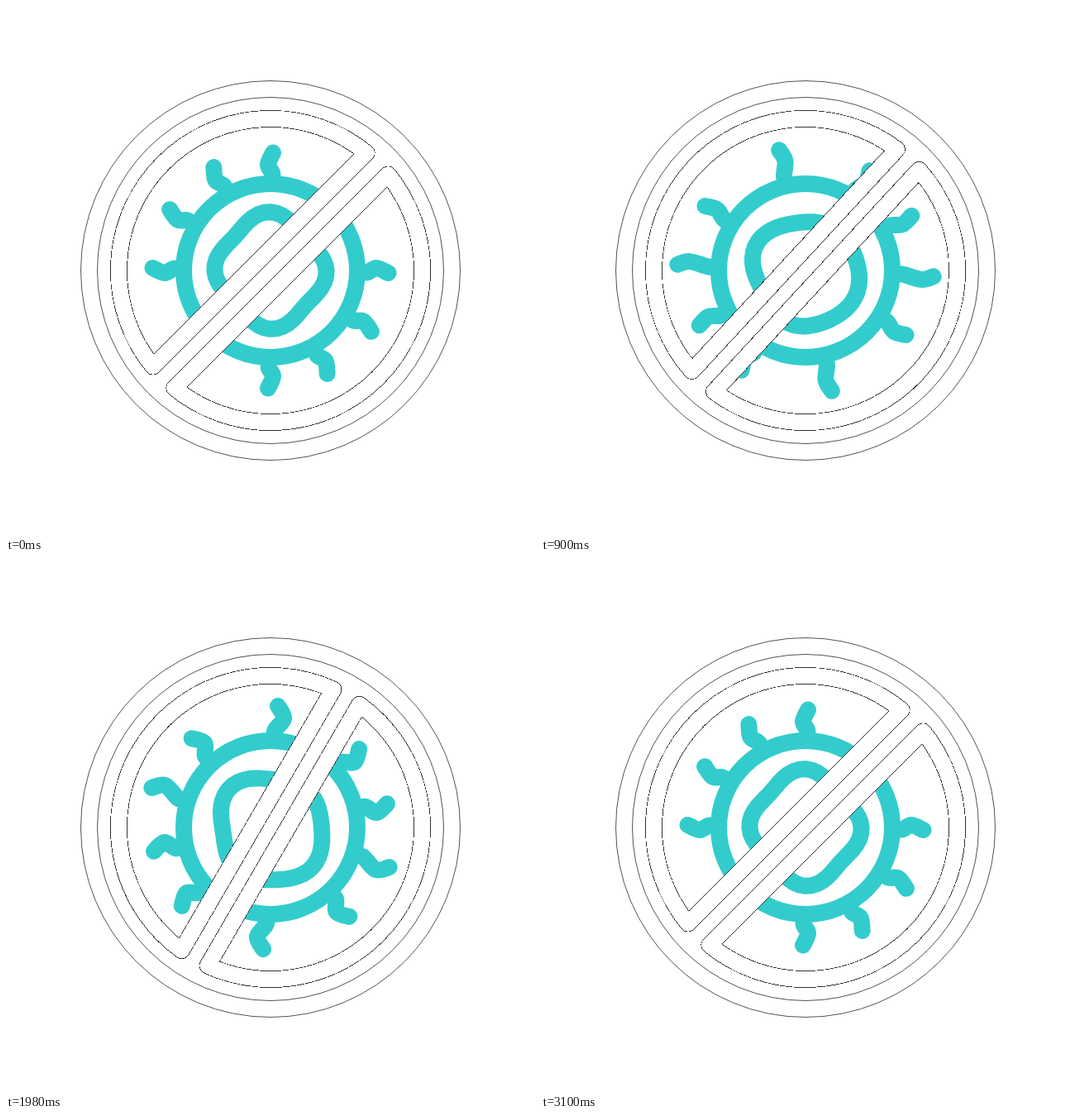
These frames come from a looping animation (640 px wide and 640 px high, 3120 ms). An HTML page:

```html
<!DOCTYPE html>
<html lang="en">
<head>
<meta charset="utf-8">
<title>No virus</title>
<style>
  html, body { margin: 0; width: 100%; height: 100%; overflow: hidden; background: #fff; }
  svg { display: block; width: 100vw; height: 100vh; }
  .virus { fill: none; stroke: #3cc; stroke-width: 20; stroke-linecap: round; stroke-linejoin: round; }
  .ring, .edge, .band { fill: none; stroke-linejoin: round; shape-rendering: crispEdges; }
  .ring { stroke: #333; stroke-width: .85; }
  .edge { stroke: #333; stroke-width: 20.8; }
  .band { stroke: #fff; stroke-width: 19.2; }
</style>
</head>
<body>
<svg viewBox="-320 -320 640 640">
  <defs>
    <path id="half" d="M-182.6 -18.3A183.5 183.5 0 0 1 182.6 -18.3Z"/>
  </defs>
  <g class="virus">
    <circle r="105"/>
    <path id="nucleus"/>
    <path id="spikes"/>
  </g>
  <g id="bar">
    <rect x="-185" y="-20" width="370" height="40" fill="#fff"/>
    <use href="#half" class="edge"/>
    <use href="#half" class="band"/>
    <g transform="rotate(180)">
      <use href="#half" class="edge"/>
      <use href="#half" class="band"/>
    </g>
  </g>
  <circle class="ring" r="229.5"/>
  <circle class="ring" r="209.5"/>
</svg>
<script>
const LOOP = 3120, STEP = 20, LAST = LOOP - STEP;
const byId = id => document.getElementById(id);

// Key poses as [time, value]
const tilt = [[0, 45], [690, 30.7], [1120, 65], [1545, 25], [1965, 59.9], [2450, 38], [LAST, 45]];
const turn = [[0, 0], [680, -50], [1140, -61], [1540, -59], [1980, -41.5], [2400, -5], [LAST, 0]];
const bend = [[0, -3], [680, 8], [1140, 0], [1540, 3], [1980, 8], [2400, -2.5], [LAST, -3]];

// Smooth monotone curve through the keys, flat at turning points
function curve(keys, t) {
  const last = keys.length - 1;
  const slope = i => (keys[i + 1][1] - keys[i][1]) / (keys[i + 1][0] - keys[i][0]);
  const tangent = i => {
    if (i === 0 || i === last) return 0;
    const a = slope(i - 1), b = slope(i);
    return a * b > 0 ? 2 * a * b / (a + b) : 0;
  };
  let i = 0;
  while (i < last - 1 && t > keys[i + 1][0]) i++;
  const [[t0, v0], [t1, v1]] = keys.slice(i, i + 2);
  const h = t1 - t0, x = (t - t0) / h;
  return v0 + (v1 - v0) * x * x * (3 - 2 * x)
    + h * x * (1 - x) * ((1 - x) * tangent(i) - x * tangent(i + 1));
}

const wave = deg => Math.cos(deg * Math.PI / 180);

// Point at distance u along a clockwise angle, shifted sideways by v
function polar(deg, u, v = 0) {
  const s = wave(deg - 90), c = wave(deg);
  return [u * s + v * c, v * s - u * c];
}

const text = p => p.map(n => n.toFixed(2)).join(' ');

// Smooth open path through the points
function smooth(pts) {
  const at = i => pts[Math.max(0, Math.min(pts.length - 1, i))];
  const lead = (p, from, to) => p.map((n, k) => n + (to[k] - from[k]) / 6);
  let d = 'M' + text(pts[0]);
  for (let i = 0; i < pts.length - 1; i++) {
    const p = at(i), q = at(i + 1);
    d += 'C' + [lead(p, at(i - 1), q), lead(q, at(i + 2), p), q].map(text).join(' ');
  }
  return d;
}

// Four lobes at rest; lopsided and slightly lowered as the body winds up
function nucleusPath(spin, wind) {
  const pts = [];
  for (let a = 0; a < 360; a += 6) {
    const r = 63.5
      + (5.7 - 3.7 * wind) * wave(4 * (a + 8 * wind))
      + 2.5 * wave(2 * (a + 25 - 38 * wind))
      + 2 * wind * wave(3 * a);
    const [x, y] = polar(a + spin, r);
    pts.push([x + 1.3 * wind, y + 2.5 * wind]);
  }
  return 'M' + pts.map(text).join('L') + 'Z';
}

function spikePath(deg, length, b) {
  const root = b < 0 ? -.8 * b : -.25 * b;
  const tip = Math.max(0, -b);
  return smooth([
    polar(deg, 106), polar(deg, 117, root), polar(deg, length - 14.5, b), polar(deg, length, tip)
  ]);
}

// Both halves carry the same five spikes, two of which lengthen more
function spikesPath(spin, wind, b) {
  let d = '';
  for (const side of [0, 180])
    for (const [deg, extra] of [[0, 2], [45, 7], [90, 1], [120, 2], [150, 13]])
      d += spikePath(side + deg + spin, 142.5 + extra * wind, b);
  return d;
}

function draw(t) {
  const spin = curve(turn, t), wind = -spin / 60;
  byId('bar').setAttribute('transform', `rotate(${-curve(tilt, t)})`);
  byId('nucleus').setAttribute('d', nucleusPath(spin, wind));
  byId('spikes').setAttribute('d', spikesPath(spin, wind, curve(bend, t)));
}

const start = performance.now();
function frame() {
  const t = (performance.now() - start) % LOOP;
  draw(Math.min(LAST, t - t % STEP));
  requestAnimationFrame(frame);
}
frame();
</script>
</body>
</html>
```
